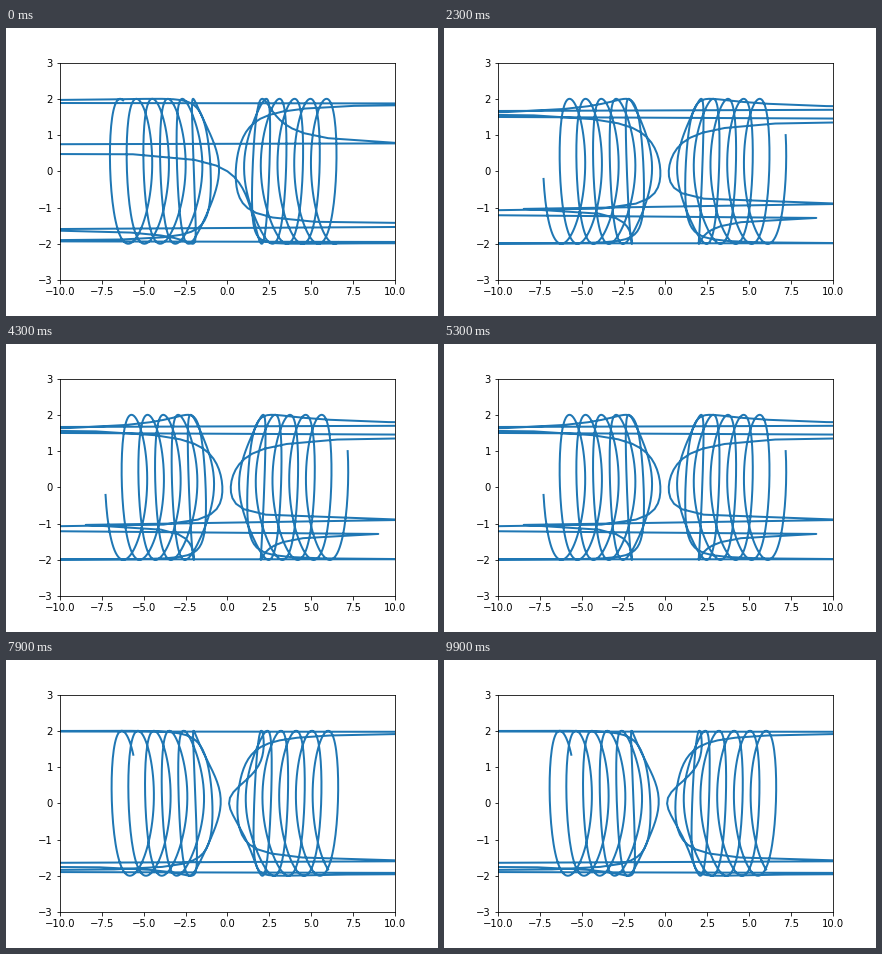
Recreate the animation shown at these times as a matplotlib script. Size 432x288 px, loop 10 s.

```python
import numpy as np
import matplotlib.pyplot as plt
from matplotlib.animation import FuncAnimation

FRAMES = 100
INTERVAL = 100  # ms
TURN = 10       # frames per full turn of the phase

fig = plt.figure(figsize=(6, 4), dpi=72)
fig.subplots_adjust(left=0.125, right=0.9, bottom=0.125, top=0.88)
ax = fig.add_subplot(xlim=(-10, 10), ylim=(-3, 3))
line, = ax.plot([], [], lw=2)

t = np.linspace(-2 * np.pi, 2 * np.pi, 1000)


def curve(phase):
    """Circle rolling along t, stretched by r^2 / u with poles where u = 0."""
    angle = 2 * np.pi * (t + 0.5 + phase)
    u = t + np.cos(angle)
    v = np.sin(angle)
    return u + v**2 / u, 2 * v


def update(i):
    line.set_data(*curve(i % TURN / TURN))
    return line,


anim = FuncAnimation(fig, update, frames=FRAMES, interval=INTERVAL,
                     repeat=True, repeat_delay=0)
plt.show()
```
